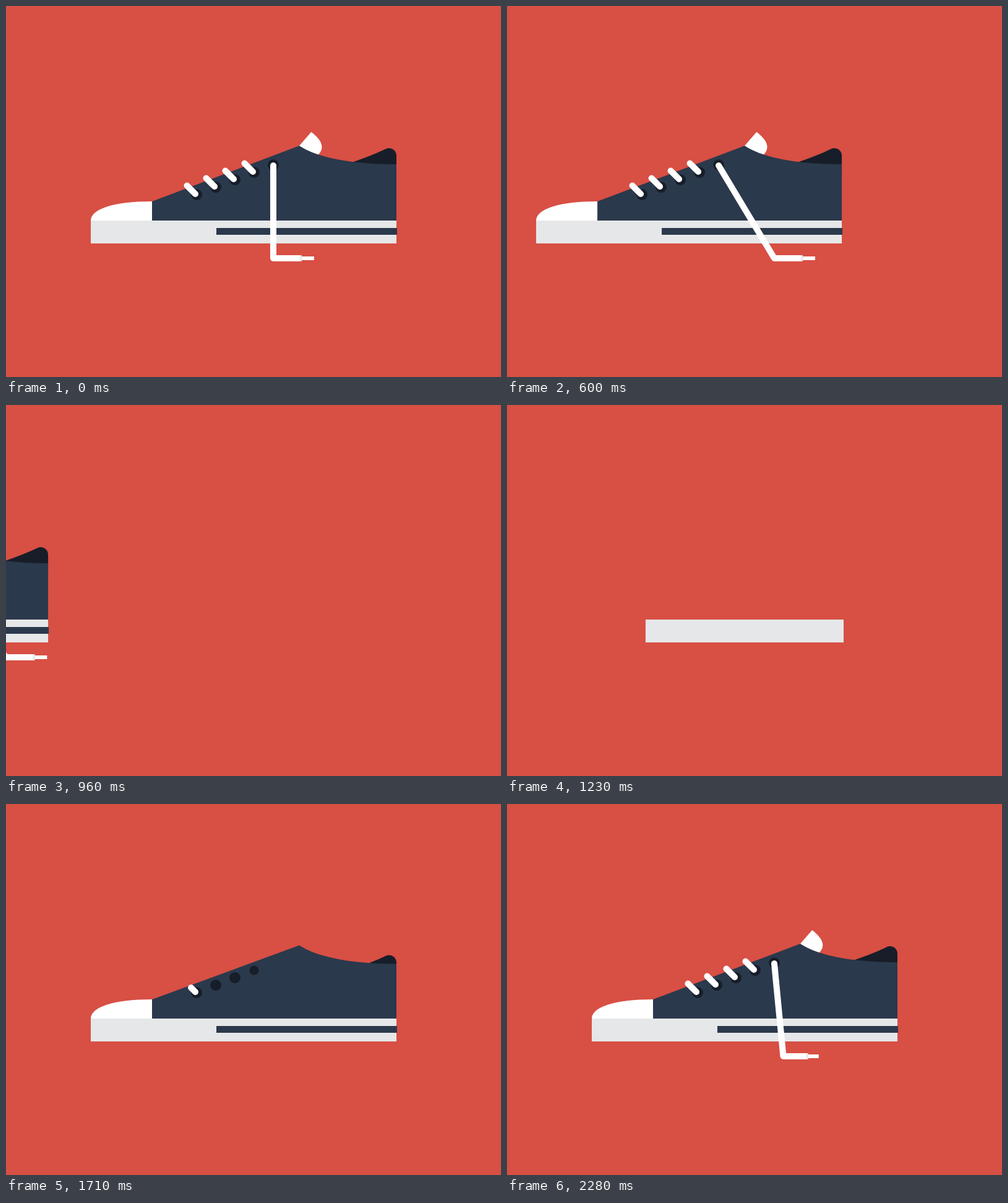
These frames come from a looping animation (800x600 px, 2.31 s). An HTML page:

```html
<!DOCTYPE html>
<html lang="en">
<head>
<meta charset="utf-8">
<title>Sneaker</title>
<style>
  html, body { margin: 0; width: 100%; height: 100%; overflow: hidden; background: #d84f44; }
  svg { display: block; width: 100%; height: 100%; }
  .navy { fill: #2b394c; }
  .dark { fill: #171e29; }
  .pale { fill: #e6e7e8; }
  .white { fill: #fff; }
  .lace { fill: none; stroke: #fff; stroke-width: 10; stroke-linecap: round; stroke-linejoin: round; }
</style>
</head>
<body>
<svg viewBox="0 0 800 600">
  <g id="shoe">
    <path id="tongue" class="white" d="M474 226L494 203C512 217 516 229 505 240L490 250Z"/>
    <path id="heel" class="dark" d="M540 259Q585 245 613 231.500C622 227 631 233 631 242V270H540Z"/>
    <path id="upper" class="navy"/>
    <path id="toe" class="white" d="M137 347C137 329 172 316 236 316V347Z"/>
    <rect id="sole" class="pale" y="347" height="37"/>
    <rect id="stripe" class="navy" y="359" height="11"/>
    <g id="eyelets"></g>
    <g id="laces"></g>
  </g>
  <g id="loose">
    <path id="strand" class="lace"/>
    <g id="tail">
      <path class="lace" style="stroke-linecap:butt" d="M0 0H46"/>
      <rect class="pale" x="43" y="-5" width="3" height="10"/>
      <rect class="white" x="46" y="-3" width="20" height="6"/>
    </g>
  </g>
</svg>
<script>
const LOOP = 2310, BUILD_START = 1050;
const $ = id => document.getElementById(id);
const set = (el, attrs) => { for (const k in attrs) el.setAttribute(k, attrs[k]); };
const show = (el, on) => { el.style.display = on ? '' : 'none'; };
const add = (parent, tag, attrs) => {
  const el = document.createElementNS('http://www.w3.org/2000/svg', tag);
  set(el, attrs);
  return parent.appendChild(el);
};

const progress = (t, start, length) => Math.min(1, Math.max(0, (t - start) / length));
const easeOut = x => 1 - (1 - x) ** 3;
const smooth = x => x * x * (3 - 2 * x);
const decay = (t, start, rate) => Math.exp(-Math.max(0, t - start) * rate);

// Cubic Bezier ease-in whose handles both lie on the time axis
function easeIn(x, x1, x2) {
  let low = 0, high = 1;
  for (let i = 0; i < 30; i++) {
    const s = (low + high) / 2, r = 1 - s;
    if (3 * s * r * r * x1 + 3 * s * s * r * x2 + s ** 3 < x) low = s; else high = s;
  }
  return low ** 3;
}

const holes = [0, 1, 2, 3, 4].map(i => ({ x: 308 + 31 * i, y: 305 - 12 * i }));
const eyelets = holes.map(h => add($('eyelets'), 'circle', { class: 'dark', cx: h.x, cy: h.y }));
const laces = holes.slice(0, 4).map(() => add($('laces'), 'path', { class: 'lace' }));

// Swing of the loose lace: time, elbow x y, tip x y
const swing = [
  [2010, 432, 258, 432, 258],
  [2070, 495, 215, 535, 190],
  [2115, 562, 222, 618, 172],
  [2160, 606, 278, 672, 306],
  [2220, 508, 382, 570, 404],
  [2280, 447, 408, 504, 408],
  [2310, 432, 408, 498, 408]
];

function swingAt(t) {
  const i = Math.max(1, swing.findIndex(k => k[0] >= t));
  const a = swing[i - 1], b = swing[i], p = progress(t, a[0], b[0] - a[0]);
  return a.slice(1).map((v, n) => v + (b[n + 1] - v) * p);
}

function drawUpper(t) {
  const drop = 125 * decay(t, 1304, 0.0096);
  const toe = easeOut(progress(t, 1260, 190));
  const y = v => Math.min(347, v + drop);
  set($('toe'), { transform: `translate(0 ${347 * (1 - toe)}) scale(1 ${toe})` });
  set($('upper'), {
    d: `M236 ${347 - 31 * toe}L474 ${y(226)}C506 ${y(247)} 565 ${y(256)} 631 ${y(256)}V347H236Z`
  });
}

function drawSole(t) {
  const width = 494 * smooth(progress(t, 1090, 235));
  const stripe = 292 * easeOut(progress(t, 1320, 298));
  set($('sole'), { x: 384 - width / 2, width });
  set($('stripe'), { x: 632 - stripe, width: stripe });
}

function drawCollar(t) {
  const slide = 28 * decay(t, 1878, 0.0083);
  show($('tongue'), t > 1878);
  show($('heel'), t > 1640);
  set($('tongue'), { transform: `translate(${-slide * 0.85} ${slide})` });
  set($('heel'), { transform: `translate(0 ${26 * decay(t, 1640, 0.0083)})` });
}

function drawLaces(t) {
  eyelets.forEach((el, i) => set(el, { r: 9 * easeOut(progress(t, 1448 + 65 * i, 150)) }));
  laces.forEach((el, i) => {
    const p = easeOut(progress(t, 1679 + 90 * i, 150));
    const { x, y } = holes[i];
    show(el, p > 0);
    set(el, { d: `M${x - 2} ${y - 1}l${-13.5 * p} ${-13.5 * p}` });
  });
}

function drawLoose(t, shift, drag) {
  const [ex, ey, tx, ty] = swingAt(t);
  const angle = Math.atan2(ty - ey, tx - ex) * 180 / Math.PI;
  const stretch = Math.hypot(tx - ex, ty - ey) / 66;
  show($('loose'), t > 2010);
  set($('strand'), { d: `M${432 - shift} 258L${ex - drag} ${ey}` });
  set($('tail'), { transform: `translate(${ex - drag} ${ey}) rotate(${angle}) scale(${stretch} 1)` });
}

function draw(time) {
  const leaving = time < BUILD_START;
  const t = leaving ? LOOP : time;
  const shift = leaving ? 640 * easeIn(progress(time, 0, 990), 0.464, 0.77) : 0;
  const drag = leaving ? 134 * (Math.max(0, time - 620) / 190) ** 2 : 0;
  set($('shoe'), { transform: `translate(${-shift} 0)` });
  drawSole(t);
  drawUpper(t);
  drawCollar(t);
  drawLaces(t);
  drawLoose(t, shift, drag);
}

const begin = performance.now();
function tick() {
  draw((performance.now() - begin) % LOOP);
  requestAnimationFrame(tick);
}
tick();
</script>
</body>
</html>
```
